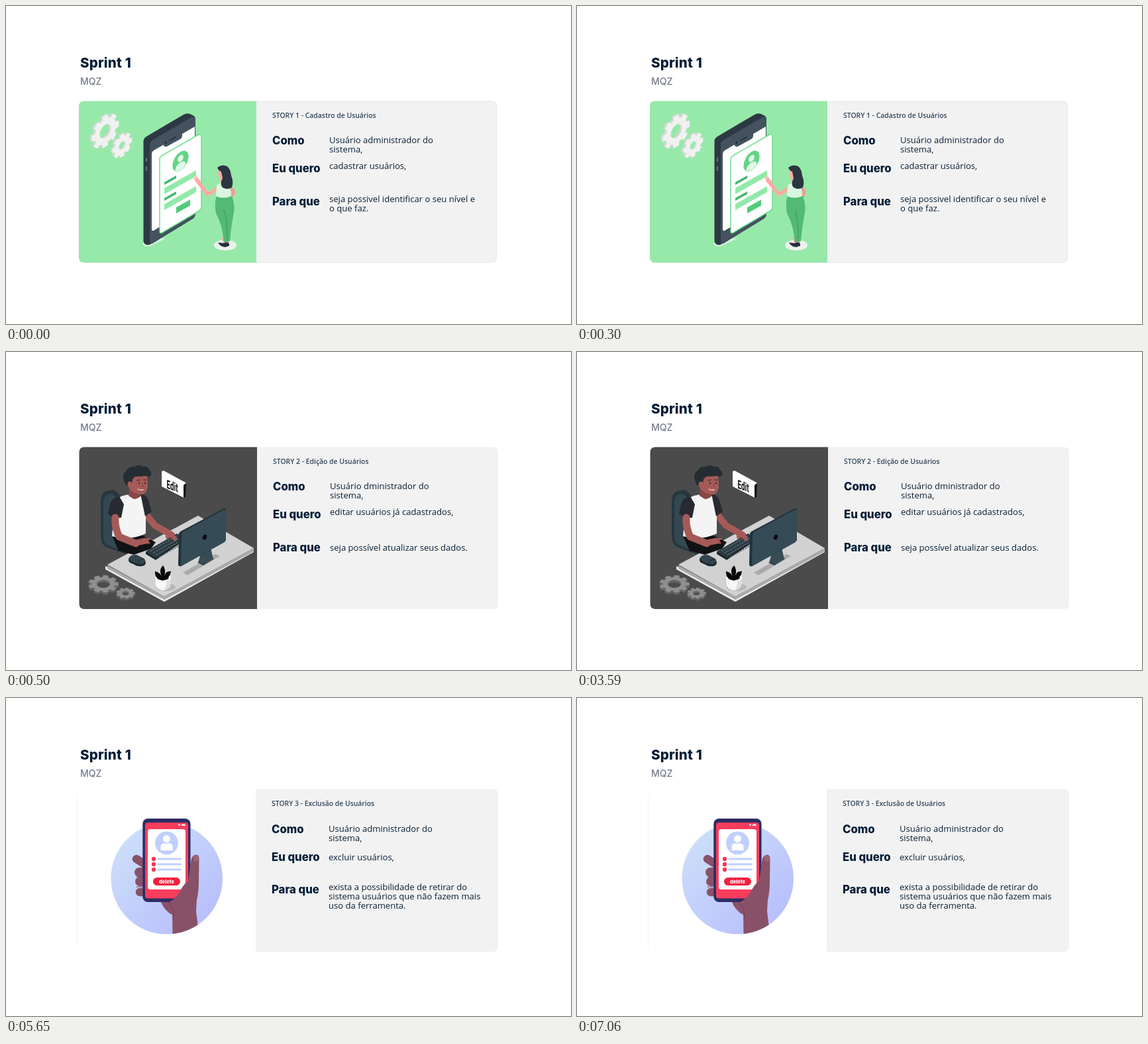
Write an HTML page that moves like this. It is 853x480 px and loops after 8 s.

```html
<!DOCTYPE html>
<html lang="pt">
<head>
<meta charset="utf-8">
<title>Sprint 1</title>
<style>
html, body { margin: 0; width: 100%; height: 100%; overflow: hidden; background: #fff; }
svg { display: block; width: 100vw; height: 100vh; }
text { font-family: "Open Sans", "Noto Sans", sans-serif; fill: #0b2035; }
.title, .head, .sub, .pill { font-family: Inter, sans-serif; }
.title { font-size: 20.5px; font-weight: 800; letter-spacing: .2px; fill: #021c36; }
.sub { font-size: 14px; font-weight: 500; fill: #747b8b; }
.head { font-size: 16.7px; font-weight: 800; fill: #021c36; }
.story { font-size: 10.4px; font-weight: 600; fill: #33455b; }
.body { font-size: 13.08px; }
.pill { font-size: 7.5px; font-weight: 800; fill: #fff; text-anchor: middle; }
.sign { font: 700 18px Roboto, sans-serif; fill: #111; }
</style>
</head>
<body>
<svg id="stage" viewBox="0 0 853 480" xmlns="http://www.w3.org/2000/svg"></svg>
<script>
const LOOP = 8000;
const STARTS = [0, 500, 5650];

const path = (d, fill, extra = '') => `<path d="${d}" fill="${fill}" ${extra}/>`;
const line = (d, color, width, cap = 'round', extra = '') =>
  path(d, 'none', `stroke="${color}" stroke-width="${width}" stroke-linecap="${cap}" stroke-linejoin="round" ${extra}`);
const oval = (x, y, rx, ry, fill, extra = '') =>
  `<ellipse cx="${x}" cy="${y}" rx="${rx}" ry="${ry}" fill="${fill}" ${extra}/>`;
const rect = (x, y, w, h, r, fill) =>
  `<rect x="${x}" y="${y}" width="${w}" height="${h}" rx="${r}" fill="${fill}"/>`;
const text = (cls, x, y, s) => `<text class="${cls}" x="${x}" y="${y}">${s}</text>`;
const group = (transform, content) => `<g transform="${transform}">${content}</g>`;

// Slanted bar following the receding plane of the first phone.
const slantBar = (x, y, w, h, fill) => path(`M${x} ${y}l${w} ${-w * .56}v${h}l${-w} ${w * .56}z`, fill);

function gearPath(teeth, r, hole) {
  const pts = [];
  for (let i = 0; i < teeth; i++) {
    [[-.3, .78], [-.22, 1], [.22, 1], [.3, .78]].forEach(([o, k]) => {
      const a = (i + o) / teeth * Math.PI * 2;
      pts.push(`${(Math.cos(a) * r * k).toFixed(2)} ${(Math.sin(a) * r * k).toFixed(2)}`);
    });
  }
  return `M${pts.join('L')}ZM${hole} 0A${hole} ${hole} 0 1 0 ${-hole} 0A${hole} ${hole} 0 1 0 ${hole} 0Z`;
}

function gear(x, y, matrix, [dx, dy], teeth, r, hole, face, side) {
  const d = gearPath(teeth, r, hole);
  const layer = (k, color) => group(`translate(${x + dx * k} ${y + dy * k}) matrix(${matrix} 0 0)`,
    path(d, color, `fill-rule="evenodd" stroke="${color}" stroke-width="1.5" stroke-linejoin="round"`));
  return [1, .75, .5, .25].map(k => layer(k, side)).join('') + layer(0, face);
}

// Half of a card: square at the inner edge, rounded at the outer one.
function panel(inner, y, outer, bottom, fill) {
  const r = 8, s = Math.sign(outer - inner) * r;
  return path(`M${inner} ${y}H${outer - s}q${s} 0 ${s} ${r}V${bottom - r}q0 ${r} ${-s} ${r}H${inner}z`, fill);
}

// rows: [label, label baseline, first text baseline, lines]
function story(x, y, name, rows) {
  return text('story', x, y, name) + rows.map(([label, ly, by, lines]) =>
    text('head', x, ly, label) +
    lines.map((s, i) => text('body', x + 86, by + i * 14, s)).join('')).join('');
}

function signUp() {
  const wall = '.866 -.5 0 1';
  return panel(378, 143.5, 110, 387.5, '#97e9aa') +
    panel(378, 143.5, 741, 387.5, '#f2f2f2') +
    path('M378 144H733q7.5 0 7.5 7.5V379.5q0 7.5-7.5 7.5H378', 'none', 'stroke="#e8e8e8"') +
    gear(150, 189, wall, [-3, -1], 8, 23, 10.5, '#f1f1f1', '#d5d8d6') +
    gear(175.5, 210.5, wall, [-2.5, -1], 8, 16.5, 6.5, '#f1f1f1', '#d5d8d6') +
    // phone
    path('M206 358L225 348 240 352 216 363Q208 364 206 358Z', '#d9efdf') +
    path('M207.5 204Q207.5 200 212 197L268 164Q273 161 278 163L283 165.5Q286 167 286 171V313Q286 318 282 321L219 359Q215 362 211 360 207.5 358 207.5 354Z', '#2c3944') +
    path('M217 210Q217 205 222 202L278 169Q286 165 286 172V313Q286 318 282 321L222 358Q217 361 217 355Z', '#43525e') +
    line('M212 230v4M212 243v5', '#5c6a75', 2.5) +
    path('M220 223Q220 220 223 218L285 182V302L223 339Q220 340 220 337Z', '#fff') +
    path('M237 207L266 190V196Q266 199 263 201L243 212Q238 214 237 207Z', '#43525e') +
    line('M247 203l9-5', '#26323c', 2) + oval(241, 206, 1.5, 2, '#26323c') +
    // form
    path('M232 231Q232 228 235 226L291 194Q295 192 295 197V303Q295 307 292 309L236 342Q232 344 232 340Z', '#fff', 'stroke="#69df8c" stroke-width="1.5"') +
    group(`matrix(${wall} 263.5 234)`,
      oval(0, 0, 14, 14, '#62d587') + oval(0, -4, 5, 5, '#e2f8e8') +
      path('M-9 10Q-9 2 0 2T9 10Q0 17-9 10Z', '#e2f8e8')) +
    slantBar(239, 266, 18, 4, '#42b66a') + slantBar(239, 275, 48, 9, '#91eaa9') +
    slantBar(239, 290, 18, 4, '#42b66a') + slantBar(239, 299, 48, 9, '#91eaa9') +
    slantBar(257, 304, 21, 9, '#4fcb79') +
    // woman
    oval(331, 361, 17, 8, '#edf2ee') +
    line('M338 274Q345 279 343 283L338 290', '#f49b96', 5) +
    path('M325 349l6 0 4 9-5 3z', '#f9aaa4') + path('M332 350h5l-1 9-5 1z', '#f49b96') +
    path('M320 357l9 1q6-3 8 1l0 3-6 2q-8-1-11-7z', '#263039') +
    path('M318 286L341 287Q347 302 343 317 340 333 338 355L329 357Q327 331 317 313 314 299 318 286Z', '#52ba73') +
    line('M329 308Q334 320 334 352', '#3f9f61', 1.2) +
    line('M321 273Q313 281 304 284L292 268', '#ffaba4', 5.5) +
    path('M294 271L287 267 283 258 287 260 286 255 290 260 293 263 297 270Z', '#ffaba4') +
    path('M318 271Q323 266 329 267L338 270 340 287Q328 292 317 287Z', '#d9f7e0') +
    path('M321 247Q327 242 333 249L332 261 328 267 323 266 324 260Q319 259 321 247Z', '#ffaba4') +
    path('M319 244Q326 238 334 242 339 246 340 256 344 266 341 274 334 278 327 274 322 269 327 260L325 250Q321 249 319 244Z', '#2b3640') +
    story(402, 169, 'STORY 1 - Cadastro de Usuários', [
      ['Como', 209, 207, ['Usuário administrador do', 'sistema,']],
      ['Eu quero', 250.5, 246, ['cadastrar usuários,']],
      ['Para que', 300.5, 295.5, ['seja possivel identificar o seu nível e', 'o que faz.']]]);
}

function keys() {
  let s = '';
  for (let row = 0; row < 4; row++)
    s += line(`M${218 + row * 4.5} ${300.5 + row * 3}l40-23`, '#5a676f', 1.6, 'butt', 'stroke-dasharray="3 1.3"');
  return s;
}

function edit() {
  const floor = '1 0 0 .58', skin = '#a65a58', shade = '#874645';
  return panel(379, 143.5, 110.5, 388, '#4b4b4b') +
    panel(379, 143.5, 743, 388, '#f2f2f2') +
    // chair
    path('M143 225Q143 213 151 210L162 208Q176 214 175 232L191 306 180 305 150 294Q143 289 143 278Z', '#273740') +
    path('M147 226Q148 215 157 214 170 217 171 236L176 301 153 291Q147 286 147 279Z', '#344852') +
    // desk
    path('M150 323L239 372 374 297V302L239 377 150 328Z', '#eeeeee') +
    path('M153 322L239 369 374 296V301L239 374 153 327Z', '#aaaaaa') +
    path('M153 321L290 247 374 296 239 369Z', '#d2d2d2') +
    // man
    path('M160 277L200 274 226 287 219 297 193 306 170 300Z', '#111214') +
    line('M209 242L225 262 250 276', skin, 10) +
    path('M245 270L254 273 260 283 256 287 250 281 242 283Z', skin) +
    path('M169 220Q177 216 186 215L206 214 211 222 211 274Q186 286 160 278L163 247Z', '#f4f4f4') +
    path('M186 203L204 207 205 216Q199 222 193 222L185 217Z', shade) +
    path('M203 214Q212 215 215 224L220 241 210 248Z', '#272a30') +
    path('M171 218Q160 219 157 230L154 244Q163 252 174 250L178 230Z', '#272a30') +
    line('M165 250Q164 265 171 279L196 289', skin, 11) +
    line('M196 288L211 285', skin, 9) + line('M206 283L217 282M207 287L216 288', skin, 3) +
    path('M184 186Q198 179 213 186L214 204Q212 214 206 215 193 215 186 206Z', skin) +
    path('M178 193Q175 184 182 179 185 172 194 173 201 169 207 173 214 172 216 178 222 182 218 187 215 190 212 187 203 188 195 188L191 192 190 199 186 204Q179 201 178 193Z', '#252d33') +
    oval(187, 200, 3.5, 4.5, skin) +
    line('M198 194l4-1M208 193l4 0', '#33282a', 1.2) +
    oval(201, 198, 1, 1.3, '#20252a') + oval(210, 198, 1, 1.3, '#20252a') +
    line('M206 198l2 5-3 0', shade, 1) + line('M199 207q4 2 8 1', '#f1dcd8', 1.3) +
    // sign
    path('M235 180L238 179 272 197.5 271 219 267 220.5 235 203Z', '#151515') +
    path('M235 180L238 179 272 197.5 268 201V220L235 203Z', '#fff') +
    group('matrix(.55 .2 0 1 242.5 205.5)', text('sign', 0, 0, 'Edit')) +
    // keyboard and mouse
    path('M211 302L258 275 270 280V284L226 314 211 305Z', '#1b262c') +
    path('M211 301L258 274 270 280 226 311Z', '#2c3b43') + keys() +
    path('M241 270L252 273 259 282 255 286 249 280 241 281Z', skin) +
    path('M185 313Q187 306 197 307L209 313Q213 318 209 322 201 326 192 320 184 318 185 313Z', '#1c272d') +
    path('M185 312Q188 305 197 306L209 312Q212 317 206 320 199 321 191 317Z', '#34454e') +
    line('M199 318Q202 313 207 312', '#1c272d', 1) +
    // monitor
    path('M267 333L316 305 323 308 274 337Z', '#aaaaaa') +
    path('M289 318L306 308 314 312 298 322Z', '#27363f') +
    path('M296 298L308 291 313 313 301 320 290 318Z', '#394c56') +
    path('M261 275Q261 272 265 270L329 236Q332 235 332 239V282Q332 286 328 288L265 323Q260 325 260 320Z', '#20323b') +
    path('M265 276Q265 273 268 271L329 238Q332 237 332 240V282Q332 285 329 287L268 321Q264 323 264 319Z', '#354b56') +
    oval(300, 279.5, 3, 4, '#090e11', 'transform="rotate(24 300 279.5)"') +
    // plant
    oval(241, 355, 15, 6, '#b8b8b8') +
    path('M225 340H249L248 353Q244 360 236 360 228 358 226 353Z', '#f7f7f7') +
    path('M242 342L249 340 248 353Q244 359 238 360Q243 354 242 342Z', '#dedede') +
    oval(237, 341, 12, 5, '#fff') + oval(237, 341, 9, 3.5, '#343434') +
    path('M237 345Q224 343 225 331 233 333 235 339 230 329 237 322 242 328 239 338 241 330 249 331 248 341 237 345Z', '#080808') +
    gear(147, 350, floor, [0, 3.5], 9, 22, 11, '#8f8f8f', '#646464') +
    gear(180.5, 364, floor, [0, 3], 9, 13.5, 6, '#8f8f8f', '#646464') +
    story(403, 169, 'STORY 2 - Edição de Usuários', [
      ['Como', 209, 207, ['Usuário dministrador do', 'sistema,']],
      ['Eu quero', 251, 246, ['editar usuários já cadastrados,']],
      ['Para que', 300.5, 300, ['seja possível atualizar seus dados.']]]);
}

function remove() {
  const skin = '#895168', dark = '#713f5b';
  const items = [243, 251, 259].map(y =>
    oval(223, y, 3.2, 3.2, '#f23a57') + rect(228, y - 1.5, 37, 3, 1.5, '#bfd0fc')).join('');
  return line('M107.5 146V376', '#f3f3f3', 1) +
    panel(377, 137.5, 743, 383, '#f2f2f2') +
    `<linearGradient id="sky" x1="0" y1="0" x2="1" y2="1">
      <stop offset="0" stop-color="#cfe4fa"/><stop offset="1" stop-color="#b5b9fc"/></linearGradient>` +
    oval(242.7, 272.3, 84.3, 84.3, 'url(#sky)') +
    // fingers and arm behind the phone
    line('M197 243L210 251', skin, 12.5) + line('M201 263H212', skin, 14) +
    line('M202 277H212', skin, 14) + line('M202 293H212', skin, 12.5) +
    line('M197 270H207M197 285H207', dark, 1) +
    path('M232 300H280L287 322 289.5 342.5A84.3 84.3 0 0 1 251.5 356L251 327Q239 321 234 308Z', skin) +
    // phone
    rect(206.3, 182, 72.2, 126, 8, '#2b2d64') + rect(210, 188, 65, 114.5, 4, '#f83d5c') +
    rect(214, 198, 57, 91, 4, '#fff') +
    path('M259.5 190.5h4l-2 3z', '#fff') + rect(265, 190.5, 5.5, 2.5, .5, '#fff') +
    oval(242.5, 219, 17.5, 17.5, '#bfd0fc') + oval(242.5, 212.5, 5.5, 5.5, '#fff') +
    path('M233.5 230V225Q233.5 219.5 239 219.5H246Q251.5 219.5 251.5 225V230Z', '#fff') +
    items + rect(222, 271, 41, 12, 6, '#f31f3d') + text('pill', 242.5, 279.7, 'delete') +
    // thumb
    path('M279 248Q280 237 287 236.5 292 237 291.5 244L291 278Q291 293 288 305L287 322 274 335 251 327Q238 321 245 309 258 302 263 291 268 281 275 276Z', skin) +
    path('M283 239Q288 235 291 240L290 246Q286 249 283 245Z', '#9c6377') +
    line('M245 309Q255 320 253 332', dark, 1) +
    story(401, 163, 'STORY 3 - Exclusão de Usuários', [
      ['Como', 203.5, 201.5, ['Usuário administrador do', 'sistema,']],
      ['Eu quero', 245.5, 245, ['excluir usuários,']],
      ['Para que', 295, 290, ['exista a possibilidade de retirar do', 'sistema usuários que não fazem mais', 'uso da ferramenta.']]]);
}

const stage = document.getElementById('stage');
stage.innerHTML = text('title', 112, 93, 'Sprint 1') + text('sub', 112, 118.5, 'MQZ') +
  [signUp, edit, remove].map(scene => `<g class="scene">${scene()}</g>`).join('');
const scenes = [...stage.querySelectorAll('.scene')];

function update(now) {
  const t = now % LOOP;
  const current = STARTS.filter(s => s <= t).length - 1;
  scenes.forEach((g, i) => g.setAttribute('display', i === current ? 'inline' : 'none'));
}

function tick() {
  update(performance.now());
  requestAnimationFrame(tick);
}
tick();
</script>
</body>
</html>
```
